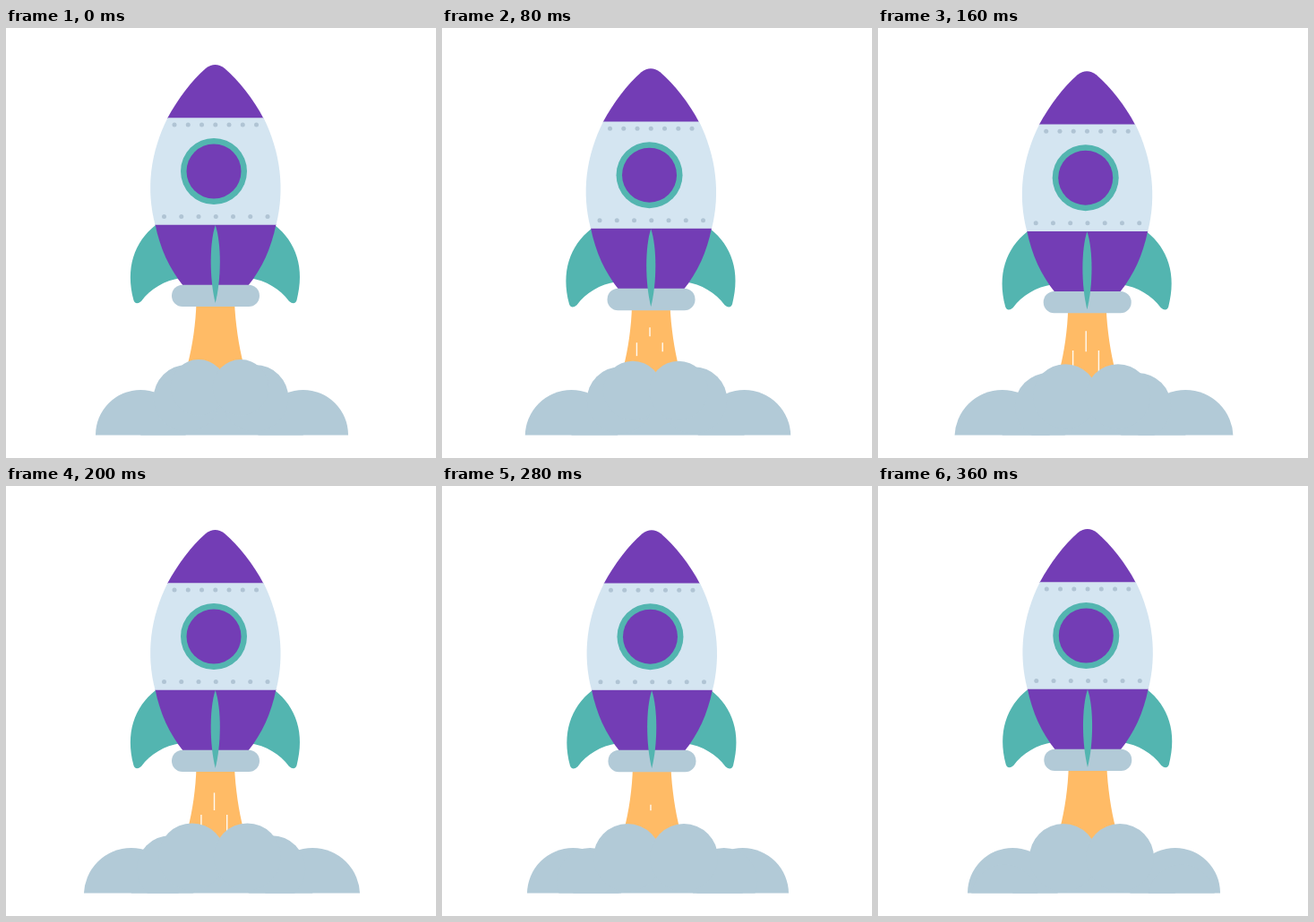
Write an HTML page that moves like this. It is 480x480 px and loops after 400 ms.

```html
<!DOCTYPE html>
<html lang="en">
<head>
<meta charset="utf-8">
<title>Rocket launch</title>
<style>
  html, body { margin: 0; width: 100%; height: 100%; overflow: hidden; background: #fff; }
  svg { display: block; width: 100%; height: 100%; }
  .purple { fill: #733db5; }
  .teal { fill: #53b5b0; }
  .hull { fill: #d4e5f1; }
  .smoke { fill: #b2cad7; }
  .rivets { fill: #b0c4d4; }
  .flame { fill: #ffbb66; }
  .streaks { stroke: #fffaf2; stroke-width: 1.4; }
</style>
</head>
<body>
<svg viewBox="0 0 480 480">
  <defs>
    <clipPath id="ground"><rect width="480" height="454.5"/></clipPath>
    <path id="fin" class="teal" d="M167 220C143 239 133 268 142.5 304Q145 310 151 305C161 291 177 282 195 279Z"/>
  </defs>
  <g id="rocket">
    <path class="flame" d="M212.5 305C212 330 208 355 203 375L199 392H269L265 375C260 355 256 330 255 305Z"/>
    <g class="streaks" id="streaks"></g>
    <use href="#fin"/>
    <use href="#fin" transform="matrix(-1 0 0 1 467 0)"/>
    <path class="purple" d="M166.5 219C172 246 182 268 198 288H270C286 268 296 246 301.5 219Z"/>
    <path class="purple" d="M180 101C192 79 207 59 223 45Q233.5 37 244 45C260 59 276 79 287.5 101Z"/>
    <path class="hull" d="M180.5 100.3C161 139 156 180 166.5 219.7H301.5C311.5 180 306.5 139 287.5 100.3Z"/>
    <g class="rivets" id="rivets"></g>
    <circle class="teal" cx="232" cy="160" r="37"/>
    <circle class="purple" cx="232" cy="160" r="30.5"/>
    <rect class="smoke" x="185" y="286.7" width="98" height="24.3" rx="12"/>
    <path class="teal" d="M233.7 220C227 240 227 280 233.7 307C240.5 280 240.5 240 233.7 220Z"/>
  </g>
  <g class="smoke" id="smoke" clip-path="url(#ground)"></g>
</svg>
<script>
const STEP = 40, STEPS = 10, MID = 239.5;

const $ = id => document.getElementById(id);

function set(el, attrs) {
  for (const key in attrs) el.setAttribute(key, attrs[key]);
}

function add(parent, tag, attrs = {}) {
  const el = document.createElementNS("http://www.w3.org/2000/svg", tag);
  set(el, attrs);
  return parent.appendChild(el);
}

function smooth(x) {
  const c = Math.min(1, x);
  return c * c * (3 - 2 * c);
}

for (let i = 0; i < 7; i++) {
  add($("rivets"), "circle", { cx: 188 + i * 15.25, cy: 108, r: 2.5 });
  add($("rivets"), "circle", { cx: 176.5 + i * 19.25, cy: 210.5, r: 2.5 });
}

// a streak grows down from its top, then the top catches up
const streaks = [
  { x: 217.9, top: 347, end: 377, from: .5, hold: 1.7 },
  { x: 232.5, top: 330, end: 354, from: 1, hold: 3 },
  { x: 246.7, top: 347, end: 377, from: 1, hold: 1.7 }
];
for (const s of streaks) s.line = add($("streaks"), "line", { x1: s.x, x2: s.x });

function drawStreak({ line, top, end, from, hold }, k) {
  const y1 = top + 1.1 * Math.max(0, k - hold) ** 2;
  const y2 = Math.min(end, top + 10 * (k - from));
  set(line, { y1, y2: Math.max(y1, y2) });
}

const base = add($("smoke"), "rect", { y: 420, height: 40 });
const pair = () => [-1, 1].map(side => ({ side, el: add($("smoke"), "circle") }));
const outer = pair(), older = pair(), newer = pair();

function placePair(puffs, mid, dx, top, r) {
  for (const { side, el } of puffs) set(el, { cx: mid + side * dx, cy: top + r, r });
}

function draw(k) {
  // quick sink, slow return, slight sway
  const x = -.5 * Math.sin(2 * Math.PI * k / STEPS);
  const y = 8.3 * Math.cos((k - 6) * (k < 6 ? Math.PI / 12 : .188));
  $("rocket").setAttribute("transform", `translate(${x} ${y})`);

  for (const s of streaks) drawStreak(s, k);

  // outer puffs swell until step 4, then shrink back
  const swell = Math.cos((k - 4) * Math.PI / (k < 4 ? 8 : 10)) ** 2;
  const r = 50.3 + 2.9 * swell;
  const dx = 141 + 14.5 * swell - r;
  placePair(outer, 241, dx, 404, r);
  set(base, { x: 241 - dx, width: 2 * dx });

  // older puffs roll outwards and sink while new ones grow
  placePair(older, 240, 38 + .75 * k * k, 376 + .57 * k * k, 37.3);
  const grow = smooth(k / 6);
  placePair(newer, 238.5, 23.5 + 8 * grow, 370 + 7 * grow, 31.3 + 6.7 * grow);
}

const start = performance.now();
function tick() {
  const elapsed = Math.max(0, performance.now() - start);
  draw(Math.floor(elapsed / STEP) % STEPS);
  requestAnimationFrame(tick);
}
tick();
</script>
</body>
</html>
```
